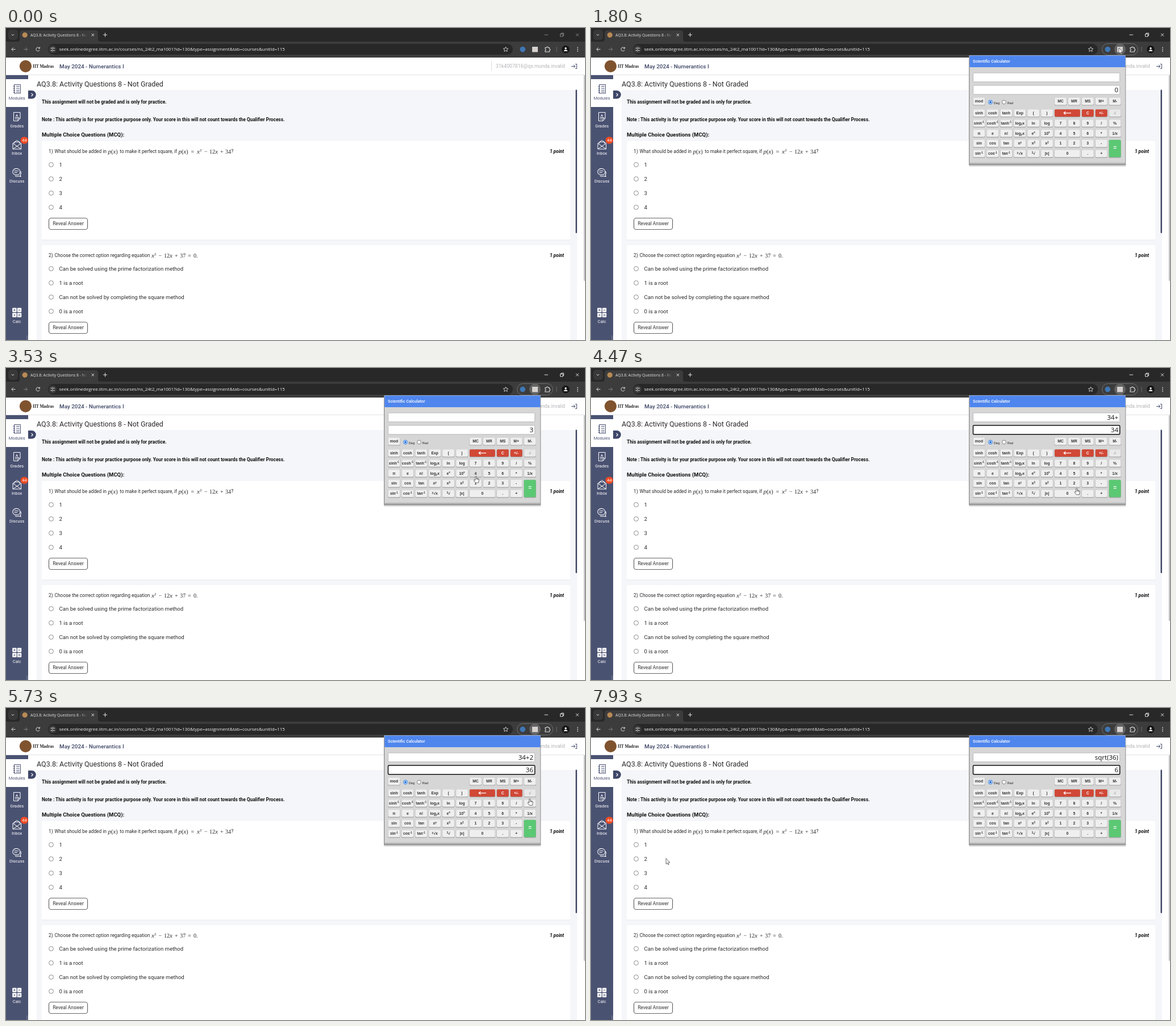
Write an HTML page that moves like this. It is 1019 by 549 pixels and loops after 8 s.

```html
<!DOCTYPE html>
<html lang="en">
<head>
<meta charset="utf-8">
<title>Calculator demo</title>
<style>
html, body { margin: 0; width: 100%; height: 100%; overflow: hidden; background: #fff; }
svg { display: block; width: 1019px; height: 549px; }
text { white-space: pre; }
</style>
</head>
<body>
<svg id="stage" viewBox="0 0 1019 549" xmlns="http://www.w3.org/2000/svg">
  <defs>
    <linearGradient id="fade"><stop offset="0" stop-color="#3c3c3c" stop-opacity="0"/><stop offset="1" stop-color="#3c3c3c"/></linearGradient>
    <linearGradient id="foot" x2="0" y2="1"><stop offset="0" stop-color="#d6d6d6"/><stop offset="1" stop-color="#8c8c8c"/></linearGradient>
    <clipPath id="tabClip"><path d="M40 4H142V22H40Z"/></clipPath>
  </defs>
</svg>
<script>
const NS = 'http://www.w3.org/2000/svg';
const stage = document.getElementById('stage');
let root = stage;

const ROBOTO = 'Roboto, sans-serif';
const UI = '"Open Sans", sans-serif';
const ARIAL = '"Liberation Sans", Arial, sans-serif';
const SERIF = '"Liberation Serif", serif';
const NAVY = '#4a5272';

function el(tag, attrs, parent = root) {
  const node = document.createElementNS(NS, tag);
  for (const key in attrs) node.setAttribute(key, attrs[key]);
  return parent.appendChild(node);
}
const group = attrs => el('g', attrs || {});
const rect = (x, y, width, height, fill, more) => el('rect', { x, y, width, height, fill, ...more });
const disc = (cx, cy, r, fill, more) => el('circle', { cx, cy, r, fill, ...more });
const line = (d, stroke, width = 1, more) => el('path', { d, stroke, 'stroke-width': width, fill: 'none', ...more });
function text(x, y, str, size, fill = '#2a2a2a', more) {
  const node = el('text', { x, y, 'font-size': size, fill, 'font-family': ROBOTO, ...more });
  node.textContent = str;
  return node;
}
const bold = { 'font-weight': 700 };
const mid = { 'text-anchor': 'middle' };

// Browser frame
rect(0, 0, 1019, 25, '#282828');
rect(0, 24, 1019, 28, '#3c3c3c');
rect(4, 3, 17, 18, '#383838', { rx: 5 });
line('M9.8 11L12 13.2L14.2 11', '#ddd');
el('path', { d: 'M20 24Q24 24 24 20V9Q24 4 29 4H157Q162 4 162 9V20Q162 24 166 24Z', fill: '#3c3c3c' });
disc(33.2, 12.3, 4.6, '#b98a54');
text(43, 14.8, 'AQ3.8: Activity Questions 8 - Not Graded', 6.8, '#e3e3e3', { 'font-family': UI, 'clip-path': 'url(#tabClip)' });
rect(130, 5, 13, 17, 'url(#fade)');
line('M150.6 10L155 14.4M155 10L150.6 14.4M171 12H178M174.5 8.5V15.5', '#e3e3e3');

const controls = line('M947.5 12H954M975.5 10.5H980V15H975.5ZM977 10.5V9H981.5V13.5H980M1003 9.5L1008 14.5M1008 9.5L1003 14.5', '#8f8f8f', 0.9);

rect(74, 28, 818, 19, '#282828', { rx: 9.5 });
line('M16.5 37.5H10M13 34.3L9.8 37.5L13 40.7', '#dcdcdc');
line('M31 37.5H37.5M34.6 34.3L37.8 37.5L34.6 40.7', '#7e7e7e');
line('M59 35.5A3.3 3.3 0 1 0 59.3 38.6M59.4 33.5V36H56.8', '#dcdcdc');
disc(82, 37.5, 6.8, '#3c3c3c');
line('M78.5 35.5H81M84 35.5H86M78.5 39.5H80.5M83.5 39.5H86', '#ddd', 0.9);
disc(82.3, 35.5, 1.2, 'none', { stroke: '#ddd', 'stroke-width': 0.8 });
disc(81.7, 39.5, 1.2, 'none', { stroke: '#ddd', 'stroke-width': 0.8 });
text(93.5, 40.4, 'seek.onlinedegree.iitm.ac.in/courses/ns_24t2_ma1001?id=130&type=assignment&tab=courses&unitId=115', 8, '#f0f0f0', { 'font-family': UI });
line('M879.5 33.2L880.8 36L883.8 36.3L881.5 38.3L882.2 41.3L879.5 39.7L876.8 41.3L877.5 38.3L875.2 36.3L878.2 36Z', '#d5d5d5', 0.9);

const pill = rect(899.5, 27.5, 63, 20, '#3c3c3c', { rx: 10, stroke: '#707070', opacity: 0 });
const halo = disc(931, 37.5, 10, '#4c4c4c', { opacity: 0 });
disc(909.3, 37.6, 4.8, '#3f77b5');
rect(926, 33, 10, 9.4, '#d6d1cf');
line('M949 34.5H951.2A1.5 1.5 0 0 1 954.2 34.5H956.3V36.8A1.5 1.5 0 0 1 956.3 39.8V42H949V39.6A1.5 1.5 0 0 0 949 36.7Z', '#dcdcdc', 1.1);
line('M969 33V42', '#686868');
disc(985, 37.5, 6.8, '#161616');
disc(985, 35.8, 1.7, '#fff');
el('path', { d: 'M981.6 40.8Q982 38.3 985 38.3T988.4 40.8Z', fill: '#fff' });
for (const y of [34.3, 37.5, 40.7]) disc(1006, y, 0.9, '#dcdcdc');

// Page header
rect(0, 52, 1019, 497, '#fff');
rect(0, 82, 1019, 1, '#e3e3e6');
disc(34.5, 67.3, 10.6, '#80532f');
text(47, 70, 'IIT Madras', 7.4, '#222', { 'font-family': SERIF, ...bold });
text(94, 70.6, 'May 2024 - Numerantics I', 9.9, '#3d4666', { 'font-weight': 500 });
line('M854.5 59V75', '#dcdce0');
text(984, 70.2, '31k4007816@qs.munda.invalid', 8.7, '#b3b4b8', { 'text-anchor': 'end' });
line('M995 67.5H1001.5M999 64.8L1001.7 67.5L999 70.2M1002 63.5H1004.5V71.5H1002', '#454c6c');

// Sidebar
rect(0, 83, 39, 466, NAVY);
rect(0, 90, 39, 49, '#fff');
el('path', { d: 'M39 110H45.5A7.2 7.2 0 0 1 45.5 124.6H39Z', fill: '#3f4768' });
line('M44.6 114.8L47.2 117.4L44.6 120', '#fff', 1.2);
const labels = [['Modules', 125.7, NAVY], ['Grades', 174.5], ['Inbox', 223.3], ['Discuss', 272.2], ['Calc', 519.2]];
for (const [name, y, fill] of labels) text(19.2, y, name, 7.5, fill || '#fff', mid);
line('M14.5 99.5H25.5V115H14.5ZM12.5 102.5H16M12.5 106H16M12.5 109.5H16M12.5 113H16M18 102.5H24M18 106H24M18 109.5H24M18 112.5H24', NAVY);
line('M13.5 148.5H25V159L21 163.5H13.5ZM25 159H21V163.5M16 157.5H22.5M16 160H19.5', '#fff');
text(19.2, 155.6, 'A', 6.2, '#fff', { ...mid, ...bold });
line('M12 203L19.3 197.5L26.6 203V213H12ZM12 203L26.6 213M26.6 203L12 213M15 203.5V200.5H23.6V203.5', '#fff');
line('M18.3 247.4C9.5 247.4 9.8 258.6 18.3 258.6C27 258.6 27 247.4 18.3 247.4ZM14.5 251.5H22M14.5 254.5H20M16 260.5Q19 262 22 260.5L26 261.5L25.2 258.5Q27 256 25.8 252.5', '#fff', 1.1);
for (const x of [11.2, 19.8]) for (const y of [492.5, 501.3]) rect(x, y, 7.4, 7.6, '#fff', { rx: 1 });
line('M13 496.3H16.8M14.9 494.4V498.2M21.6 496.3H25.4M13.5 503.7L16.3 506.5M16.3 503.7L13.5 506.5M21.6 504.2H25.4M21.6 506.2H25.4', NAVY, 0.9);
rect(25.5, 191.4, 13.5, 12.4, '#f04a23', { rx: 6.2 });
text(32.4, 200.2, '44', 7.4, '#fff', mid);
line('M36.5 541V549M38.3 541V549', '#7a819b', 0.7);

// Assignment
text(54, 103.3, 'AQ3.8: Activity Questions 8 - Not Graded', 12.47);
rect(54, 109, 951, 440, '#f5f6f9');
rect(1002.5, 108.5, 2.5, 252.5, '#414866', { rx: 1.2 });
rect(1016.8, 83, 2.2, 362, '#c3c3c6', { rx: 1 });
text(63, 133.4, 'This assignment will not be graded and is only for practice.', 8.3, '#111', bold);
text(63, 164.4, 'Note : This activity is for your practice purpose only. Your score in this will not count towards the Qualifier Process.', 8.3, '#111', bold);
text(63, 190.8, 'Multiple Choice Questions (MCQ):', 9.5, '#111', bold);

// Letters in a formula are italic; "^" raises the next sign.
function math(y, parts) {
  for (const [x, str] of parts) {
    const node = text(x, y, '', 10, '#2a2a2a', { 'font-family': SERIF });
    for (const bit of str.match(/\^.|[a-z]|[^a-z^]+/g)) {
      const up = bit[0] === '^';
      const span = el('tspan', up ? { dy: -3.6, 'font-size': 7 } : /[a-z]/.test(bit) ? { 'font-style': 'italic', 'font-size': 11 } : {}, node);
      span.textContent = up ? bit[1] : bit;
    }
  }
}
function question(top, height, number, title, options) {
  rect(63, top + 1, 930, height, '#e9eaee', { rx: 2 });
  rect(63, top, 930, height, '#fff', { rx: 2 });
  text(75, top + 21.4, number + ')', 8.3);
  text(85.6, top + 21.4, title, 8.35);
  text(982, top + 21.4, '1 point', 8.3, '#111', { 'text-anchor': 'end', 'font-style': 'italic', ...bold });
  options.forEach((label, i) => {
    const y = top + 41.5 + i * 25;
    disc(79.5, y, 3.9, '#fff', { stroke: '#777', 'stroke-width': 0.85 });
    text(93.6, y + 3.5, label, 9.56);
  });
  rect(75.5, top + 135.5, 68, 20, '#fff', { rx: 3.8, stroke: '#666', 'stroke-width': 1.2 });
  text(109.5, top + 148.4, 'Reveal Answer', 8.4, '#333', mid);
}
question(199, 173.5, 1, 'What should be added in', ['1', '2', '3', '4']);
math(220.6, [[179.5, 'p(x)']]);
text(200.3, 220.4, 'to make it perfect square, if', 8.3);
math(220.6, [[303.5, 'p(x)'], [325.5, '='], [336, 'x^2'], [349, '−'], [358, '12x'], [377, '+'], [386, '34']]);
text(396.2, 220.4, '?', 8.3);

question(382, 180, 2, 'Choose the correct option regarding equation', ['Can be solved using the prime factorization method', '1 is a root', 'Can not be solved by completing the square method', '0 is a root']);
math(403.6, [[256, 'x^2'], [268.5, '−'], [278, '12x'], [297, '+'], [306.3, '37'], [320, '='], [330, '0.']]);

// Calculator popup
const popup = root = group({ visibility: 'hidden' });
rect(665, 48, 277, 196, '#000', { opacity: 0.12, rx: 2 });
rect(665, 48, 276, 193.5, '#8f8f8f', { rx: 1 });
rect(666.3, 48, 274, 190, '#d6d6d6');
rect(666.3, 236, 274, 5, 'url(#foot)');
rect(666.3, 48.5, 274, 20.5, '#4f86ee');
text(672, 61.3, 'Scientific Calculator', 7.3, '#fff', { 'font-weight': 500 });
const field = y => rect(672.5, y, 258.2, 15.8, '#fff', { rx: 1.5, stroke: '#b4b4b4', 'stroke-width': 0.9 });
field(79);
const focusBox = field(101);
const readout = y => text(928, y, '', 11.5, '#111', { 'font-family': UI, 'text-anchor': 'end' });
const topText = readout(90.8), mainText = readout(113.2);

const buttons = [];
function button(col, row, label, { span = 1, rows = 1, fill = '#efefef', ink = '#333' } = {}) {
  const x = 672.5 + col * 23.92, y = row ? 143.3 + (row - 1) * 17.85 : 122.8;
  const w = 20.8 + (span - 1) * 23.92, h = 12.6 + (rows - 1) * 17.85;
  const size = label === '=' ? 10 : 6.8;
  rect(x - 0.3, y + 0.3, w + 0.6, h + 0.9, '#a3a3a3', { rx: 1.8 });
  const face = rect(x, y, w, h, fill, { rx: 1.8 });
  buttons.push({ x, y, w, h, face, fill });
  const cx = x + w / 2, cy = y + h / 2;
  if (label === '<') {
    line(`M${cx + 6.5} ${cy}H${cx - 6}M${cx - 3} ${cy - 2.6}L${cx - 6.3} ${cy}L${cx - 3} ${cy + 2.6}`, '#fff', 1.2);
    return;
  }
  const node = text(cx, cy + 2.3, '', size, ink, { 'font-family': ARIAL, ...mid, ...bold });
  let shift = 0;
  for (const bit of label.match(/[\^_][^ ^_]+|[^\^_]+/g)) {
    const to = bit[0] === '^' ? -2.4 : bit[0] === '_' ? 1.6 : 0;
    const part = el('tspan', { dy: to - shift, 'font-size': to ? 4.6 : size }, node);
    part.textContent = to ? bit.slice(1) : bit.trim();
    shift = to;
  }
}
const red = { fill: '#d14836', ink: '#fff' };
const keys = [
  'mod,,,,,,MC,MR,MS,M+,M-',
  'sinh,cosh,tanh,Exp,(,)',
  'sinh^-1,cosh^-1,tanh^-1,log_2 x,ln,log,7,8,9,/,%',
  'π,e,n!,log_y x,e^x,10^x,4,5,6,*,1/x',
  'sin,cos,tan,x^y,x^3,x^2,1,2,3,-',
  'sin^-1,cos^-1,tan^-1,^y √x,^3 √,|x|,,,.,+'
];
keys.forEach((row, r) => row.split(',').forEach((key, c) => key && button(c, r, key)));
button(6, 1, '<', { span: 2, ...red });
button(8, 1, 'C', red);
button(9, 1, '+/-', red);
button(10, 1, '√', { fill: '#e9e9e9', ink: '#999' });
button(6, 5, '0', { span: 2 });
button(10, 4, '=', { rows: 2, fill: '#5bc873', ink: '#fff' });
disc(703, 130.5, 3.5, '#fff', { stroke: '#1a6fe0', 'stroke-width': 1 });
disc(703, 130.5, 2, '#1a6fe0');
disc(727, 130.5, 3.4, '#fff', { stroke: '#707070', 'stroke-width': 0.9 });
text(708.8, 134.4, 'Deg', 5.6, '#222', { 'font-family': ARIAL });
text(732.8, 134.4, 'Rad', 5.6, '#222', { 'font-family': ARIAL });

// Pointer
root = stage;
const pointer = group({ 'stroke-linejoin': 'round', fill: '#fff', stroke: '#444', 'stroke-width': 0.8 });
const arrow = el('path', { d: 'M0 0V10L2.2 7.9L3.7 11.2L5.2 10.5L3.8 7.3H6.9Z' }, pointer);
const hand = el('path', { d: 'M-1.1 1Q0 -.5 1 1V4.2L4.3 5Q5.7 5.4 5.4 7.3L4.5 12H-.6L-3.5 8Q-3.9 6.2 -2.2 6.6L-1.1 7.6ZM1 4.2V6.3M2.7 4.7V6.5M4.1 5.1V6.7' }, pointer);

const LOOP = 8000, OPEN = 1730, ACTIVE = 1530, PRESS = 70;
// begin, end, x, y, optional bend
const moves = [
  [10, 670, 929, 35, 886, 260],
  [1810, 2540, 885, 185],
  [2550, 2800, 878, 206],
  [3090, 3510, 827, 190],
  [3610, 3810, 897, 225],
  [3820, 3935, 898, 229],
  [4100, 4560, 850, 209],
  [4600, 4870, 851, 206],
  [5000, 5270, 921, 212],
  [5400, 5830, 922, 151],
  [6560, 7960, 131, 264.5, 527, 313]
];
const clicks = [
  [3065, '', '3'], [3595, '', '34'], [4130, '34+', '34'],
  [4995, '34+', '2'], [5335, '34+2', '36'], [6130, 'sqrt(36)', '6']
];

function pointerAt(t) {
  let x = 951, y = 556;
  for (const [begin, end, ex, ey, bx = (x + ex) / 2, by = (y + ey) / 2] of moves) {
    if (t <= begin) break;
    const u = Math.min(1, (t - begin) / (end - begin));
    const s = u * u * (3 - 2 * u);
    const bez = (a, b, c) => a * (1 - s) ** 2 + 2 * b * s * (1 - s) + c * s * s;
    [x, y] = [bez(x, bx, ex), bez(y, by, ey)];
  }
  return [x, y];
}

function draw(t) {
  const [x, y] = pointerAt(t);
  const open = t >= OPEN, active = t >= ACTIVE;
  const near = b => x > b.x - 2 && x < b.x + b.w + 2 && y > b.y - 2.7 && y < b.y + b.h + 4;
  const over = open ? buttons.filter(near) : [];
  const pressed = clicks.some(([at]) => t >= at - PRESS && t < at);
  let shown = ['', '0'], typed = false;
  for (const [at, ...values] of clicks) if (t >= at) { shown = values; typed = true; }
  const focused = typed && !pressed;

  pointer.setAttribute('transform', `translate(${x.toFixed(2)} ${y.toFixed(2)})`);
  arrow.setAttribute('visibility', over.length ? 'hidden' : 'visible');
  hand.setAttribute('visibility', over.length ? 'visible' : 'hidden');
  controls.setAttribute('stroke', active ? '#f2f2f2' : '#8f8f8f');
  pill.setAttribute('opacity', Math.max(0, Math.min(1, (t - 870) / 330)));
  halo.setAttribute('opacity', t >= 600 ? 1 : 0);
  halo.setAttribute('fill', active ? '#636363' : '#4c4c4c');
  popup.setAttribute('visibility', open ? 'visible' : 'hidden');
  [topText.textContent, mainText.textContent] = shown;
  focusBox.setAttribute('stroke', focused ? '#111' : '#b4b4b4');
  focusBox.setAttribute('stroke-width', focused ? 1.5 : 0.9);
  for (const b of buttons) b.face.setAttribute('fill', pressed && b === over[0] && b.fill === '#efefef' ? '#dedede' : b.fill);
}

const start = performance.now();
function tick() {
  draw((performance.now() - start) % LOOP);
  requestAnimationFrame(tick);
}
draw(0);
requestAnimationFrame(tick);
</script>
</body>
</html>
```
